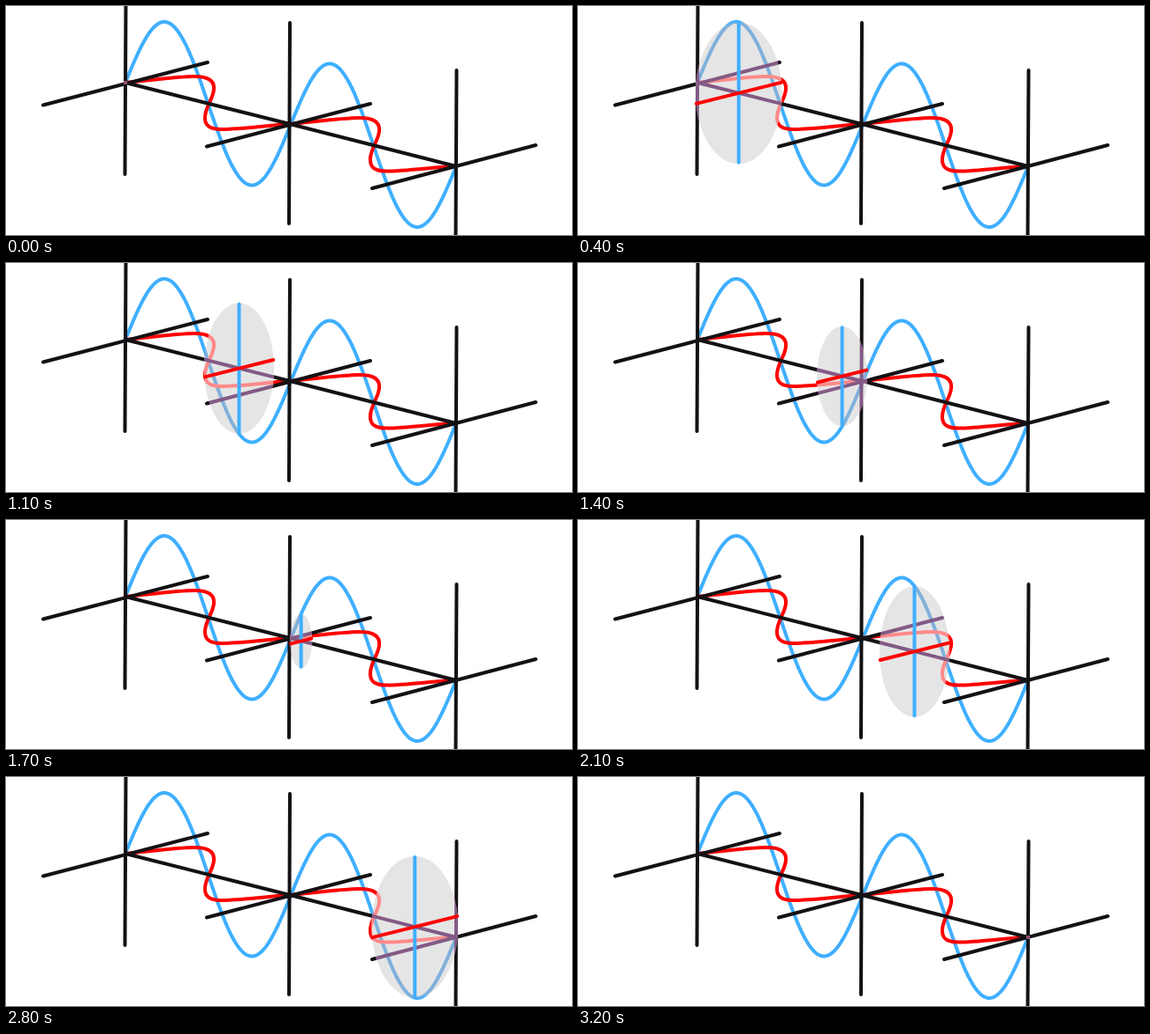
Write an HTML page that moves like this. It is 640x260 px and loops after 3.3 s.

```html
<!DOCTYPE html>
<html lang="en">
<head>
<meta charset="utf-8">
<title>Travelling wave</title>
<style>
  html, body { margin: 0; width: 100%; height: 100%; overflow: hidden; background: #fff; }
  svg { display: block; width: 640px; height: 260px; }
  path, line { fill: none; stroke-width: 4; stroke-linecap: round; }
  .scene { --axis: #141114; --blue: #3fafff; --red: #ff0000; }
  .veiled { --axis: #835a85; --blue: #80b0dc; --red: #ff8a8a; }
  .axis { stroke: var(--axis); }
  .blue { stroke: var(--blue); }
  .red { stroke: var(--red); }
</style>
</head>
<body>
<svg viewBox="0 0 640 260">
  <defs>
    <clipPath id="discClip"><ellipse class="disc"/></clipPath>
    <path id="swirl" d="M0 0C30 -3 60 -7 78 -7C94 -7 101 -2 100 8C99 19 90 28 90 40C90 50 97 53 108 53C127 53 157 49 186 47"/>
    <g id="waves">
      <path id="sine" class="blue"/>
      <g class="red">
        <use href="#swirl" x="135" y="87"/>
        <use href="#swirl" transform="translate(321 134) scale(1.01)"/>
      </g>
      <path class="axis" d="M135.5 -4L134.5 191M321 19L320 247M509.5 73L508.5 264
        M42 112.5L228 64M227 159.5L412 111M414 207L599 158
        M135 87L321 134L509 182"/>
    </g>
  </defs>
  <use href="#waves" class="scene"/>
  <g class="veiled" clip-path="url(#discClip)">
    <ellipse class="disc" fill="#e5e5e5"/>
    <use href="#waves"/>
  </g>
  <g class="scene">
    <line id="upright" class="blue"/>
    <line id="slanted" class="red"/>
  </g>
</svg>
<script>
  const START = 135, PERIOD = 187, STEPS = 32, STEP_MS = 100;
  const HEIGHT = 80.5, TILT = 0.25;
  const { sin, abs, max, min, PI } = Math;
  const byId = id => document.getElementById(id);
  const discs = document.querySelectorAll('.disc');

  const axisY = x => 87 + 0.254 * (x - START);
  const phase = x => 2 * PI * (x - START) / PERIOD;
  const lift = p => HEIGHT * sin(p);
  const reach = p => 42.65 * sin(p) + 3 * sin(2 * p) - 6.35 * sin(3 * p);

  function set(el, attrs) {
    for (const key in attrs) el.setAttribute(key, attrs[key]);
  }

  function drawSine() {
    const points = [];
    for (let x = START; x <= START + 2 * PERIOD; x += 1) {
      points.push(`${x} ${(axisY(x) - lift(phase(x))).toFixed(2)}`);
    }
    byId('sine').setAttribute('d', 'M' + points.join('L'));
  }

  function drawDisc(step) {
    const x = START + step * 2 * PERIOD / STEPS;
    const y = axisY(x), p = phase(x);
    const rx = abs(reach(p)), ry = abs(lift(p));
    const half = max(0, rx - 1), rise = max(0, ry - 1.5);

    discs.forEach(d => set(d, { cx: x, cy: y, rx: max(2, rx), ry: max(2, ry) }));
    set(byId('upright'), {
      x1: x, x2: x, y1: y - rise, y2: y + rise,
      visibility: ry < 1 ? 'hidden' : 'visible'
    });
    const slanted = byId('slanted');
    set(slanted, { x1: x - half, y1: y + half * TILT, x2: x + half, y2: y - half * TILT });
    slanted.style.strokeWidth = min(4, 1.5 + rx);
  }

  function tick(now) {
    drawDisc(Math.floor(now / STEP_MS) % (STEPS + 1));
    requestAnimationFrame(tick);
  }

  drawSine();
  drawDisc(0);
  requestAnimationFrame(tick);
</script>
</body>
</html>
```
